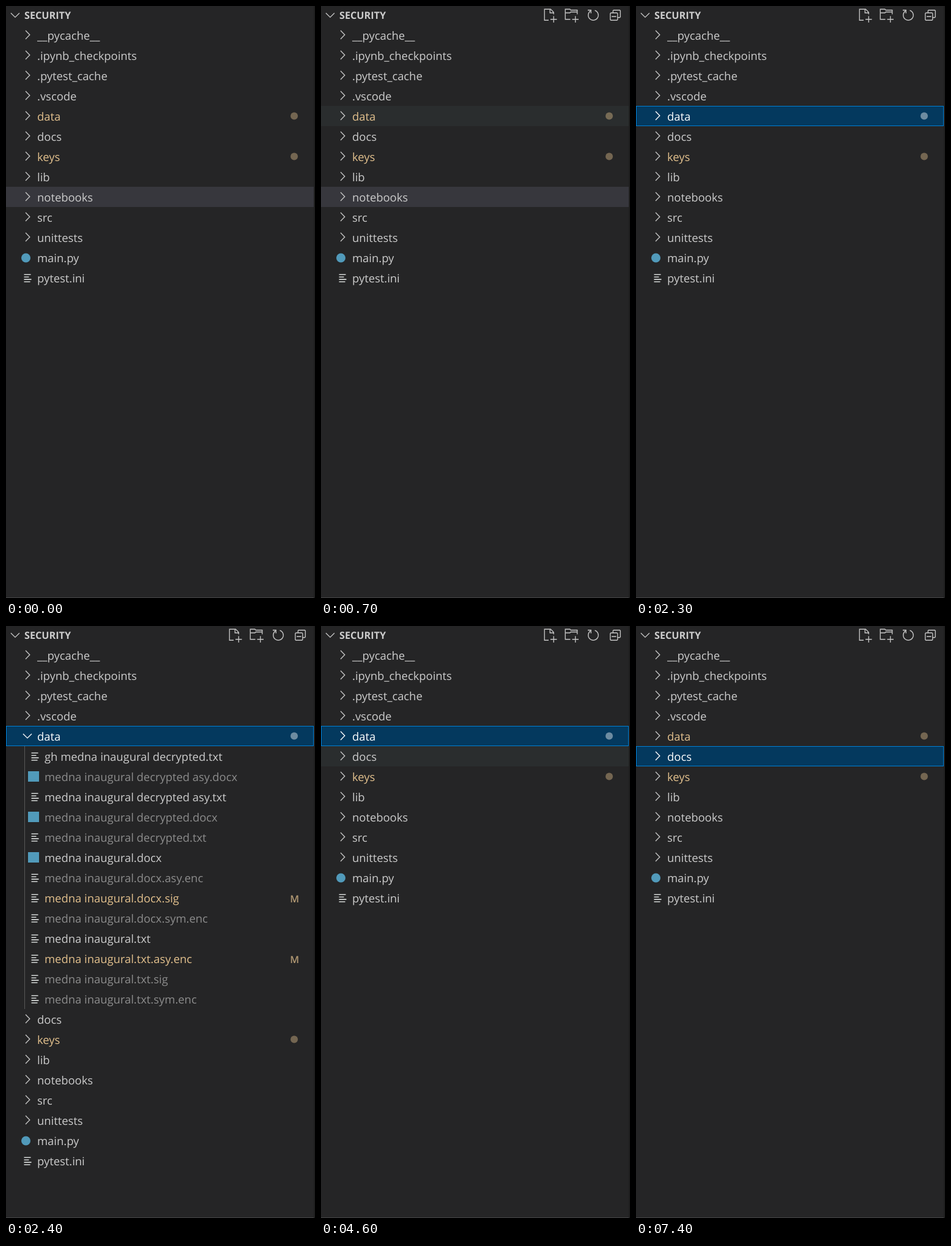
These frames come from a looping animation (505x966 px, 8 s). An HTML page:

```html
<!DOCTYPE html>
<html lang="en">
<head>
<meta charset="utf-8">
<title>File explorer</title>
<style>
  html, body { margin: 0; width: 100%; height: 100%; overflow: hidden; background: #252526; }
  svg { display: block; }
  text { font: 18.4px "Open Sans", "Noto Sans", sans-serif; text-rendering: geometricPrecision; white-space: pre; }
  .title { font-size: 16.2px; font-weight: 700; fill: #ccc; }
  .badge { font-size: 16px; font-weight: 600; text-anchor: end; fill-opacity: .75; }
  .line { fill: none; stroke: #c5c5c5; stroke-width: .9; }
</style>
</head>
<body>
<svg width="505" height="966" viewBox="0 0 505 966">
  <rect width="505" height="966" fill="#252526"/>
  <rect x="503" width="2" height="966" fill="#1e1e1e"/>
  <rect y="965" width="503" height="1" fill="#474748"/>
  <path class="line" transform="translate(3 2.5) scale(1.5)" d="M3.3 6 7.98 10.6 12.65 6"/>
  <text class="title" x="30" y="21">SECURITY</text>
  <g id="actions" class="line">
    <path transform="translate(361.5 3) scale(1.5)" d="M7 13.5H2.5v-12H9.2L12.5 4.8V7M8.5 1.5v4h4M12.5 9v7M9 12.5h7"/>
    <path transform="translate(397 3) scale(1.5)" d="M7 12.5H1.5v-11h5l1 1h7V7M1.5 5.5h5l1-1h7M12.5 9v7M9 12.5h7"/>
    <path transform="translate(433 3) scale(1.5)" d="M2 2.5h3.5V6M4.9 3.45A5.5 5.5 0 1 0 9.68 2.76"/>
    <path transform="translate(469 3) scale(1.5)" d="M5.5 5.5V3.2l.7-.7h6.6l.7.7v6.6l-.7.7h-2.3M3.2 5.5h6.6l.7.7v6.6l-.7.7H3.2l-.7-.7V6.2zM4 9.5h5"/>
  </g>
  <g id="tree"></g>
</svg>
<script>
const LOOP = 8000, ROW = 33, TOP = 31;
const COLORS = { normal: '#cccccc', modified: '#e2c08d', ignored: '#8c8c8c', selected: '#ffffff' };

// Prefix "~" marks a modified entry, "-" an ignored one.
const folders = {
  __pycache__: [], '.ipynb_checkpoints': [], '.pytest_cache': [], '.vscode': [],
  '~data': [
    'gh medna inaugural decrypted.txt', '-medna inaugural decrypted asy.docx',
    'medna inaugural decrypted asy.txt', '-medna inaugural decrypted.docx',
    '-medna inaugural decrypted.txt', 'medna inaugural.docx',
    '-medna inaugural.docx.asy.enc', '~medna inaugural.docx.sig',
    '-medna inaugural.docx.sym.enc', 'medna inaugural.txt',
    '~medna inaugural.txt.asy.enc', '-medna inaugural.txt.sig',
    '-medna inaugural.txt.sym.enc'
  ],
  docs: ['crypto_tools.html', 'makedocs.bat'],
  '~keys': [], lib: [], notebooks: [], src: [], unittests: []
};
const rootFiles = ['main.py', 'pytest.ini'];

const steps = [
  { at: 0, selected: 'notebooks', blurred: true, idle: true },
  { at: 100, selected: 'notebooks', blurred: true, hover: '.ipynb_checkpoints' },
  { at: 200, selected: 'notebooks', blurred: true, hover: '.vscode' },
  { at: 300, selected: 'notebooks', blurred: true, hover: 'data' },
  { at: 500, selected: 'notebooks', blurred: true, hover: 'docs' },
  { at: 700, selected: 'notebooks', blurred: true, hover: 'data' },
  { at: 2200, selected: 'notebooks', hover: 'data' },
  { at: 2300, selected: 'data' },
  { at: 2400, selected: 'data', open: 'data' },
  { at: 4000, selected: 'data' },
  { at: 4600, selected: 'data', hover: 'docs' },
  { at: 5500, selected: 'docs', open: 'docs' },
  { at: 7400, selected: 'docs' }
];

const tree = document.getElementById('tree');
const actions = document.getElementById('actions');

function parse(label) {
  const status = { '~': 'modified', '-': 'ignored' }[label[0]];
  return { name: status ? label.slice(1) : label, status: status || 'normal' };
}

function chevron(open, color) {
  const d = open ? 'M3.3 6 7.98 10.6 12.65 6' : 'M6 3.36 10.54 8 6 12.64';
  return `<path class="line" style="stroke:${color}" transform="translate(23 4) scale(1.5)" d="${d}"/>`;
}

function fileIcon(name, x) {
  if (name.endsWith('.py')) return `<circle cx="${x + 8.5}" cy="17" r="7.5" fill="#519aba"/>`;
  if (/\.(docx|bat)$/.test(name)) return `<rect x="${x}" y="8" width="18" height="17" fill="#519aba"/>`;
  if (name.endsWith('.html')) {
    return `<path transform="translate(${x} 0)" d="M7 12 2 17l5 5M11 12l5 5-5 5" fill="none" stroke="#e4673a" stroke-width="2"/>`;
  }
  const bars = [11, 8, 12, 10].map((w, i) => `M${x + 5.5} ${11.3 + i * 3.9}h${w}`).join('');
  return `<path d="${bars}" stroke="#d4d7d6" stroke-width="1.6"/>`;
}

function background(name, step) {
  if (name === step.selected) {
    return step.blurred
      ? `<rect width="503" height="${ROW}" fill="#37373d"/>`
      : `<rect x=".5" y=".5" width="502" height="${ROW - 1}" fill="#04395e" stroke="#007fd4"/>`;
  }
  return name === step.hover ? `<rect width="503" height="${ROW}" fill="#2a2d2e"/>` : '';
}

function row(item, index, step) {
  const { name, status, folder, child } = item;
  const focused = name === step.selected && !step.blurred;
  const color = COLORS[focused ? 'selected' : status];
  const indent = child ? 12 : 0;
  let svg = background(name, step);
  if (child) svg += `<path d="M30.5 0v${ROW}" stroke="#585858"/>`;
  svg += folder
    ? chevron(name === step.open, focused ? '#fff' : '#c5c5c5')
    : fileIcon(name, 24 + indent);
  svg += `<text x="${51 + indent}" y="24" fill="${color}">${name}</text>`;
  if (status === 'modified') {
    svg += folder
      ? `<circle cx="471" cy="16.5" r="6" fill="${color}" fill-opacity=".42"/>`
      : `<text class="badge" x="479" y="23.5" fill="${color}">M</text>`;
  }
  return `<g transform="translate(0 ${TOP + index * ROW})">${svg}</g>`;
}

function render(step) {
  const items = [];
  for (const [label, files] of Object.entries(folders)) {
    const folder = { ...parse(label), folder: true };
    items.push(folder);
    if (folder.name === step.open) {
      items.push(...files.map(file => ({ ...parse(file), child: true })));
    }
  }
  items.push(...rootFiles.map(parse));
  tree.innerHTML = items.map((item, i) => row(item, i, step)).join('');
  actions.style.display = step.idle ? 'none' : '';
}

const start = performance.now();
let shown;
function tick() {
  const time = (performance.now() - start) % LOOP;
  const step = steps.findLast(s => s.at <= time);
  if (step !== shown) render(shown = step);
  requestAnimationFrame(tick);
}
tick();
</script>
</body>
</html>
```
